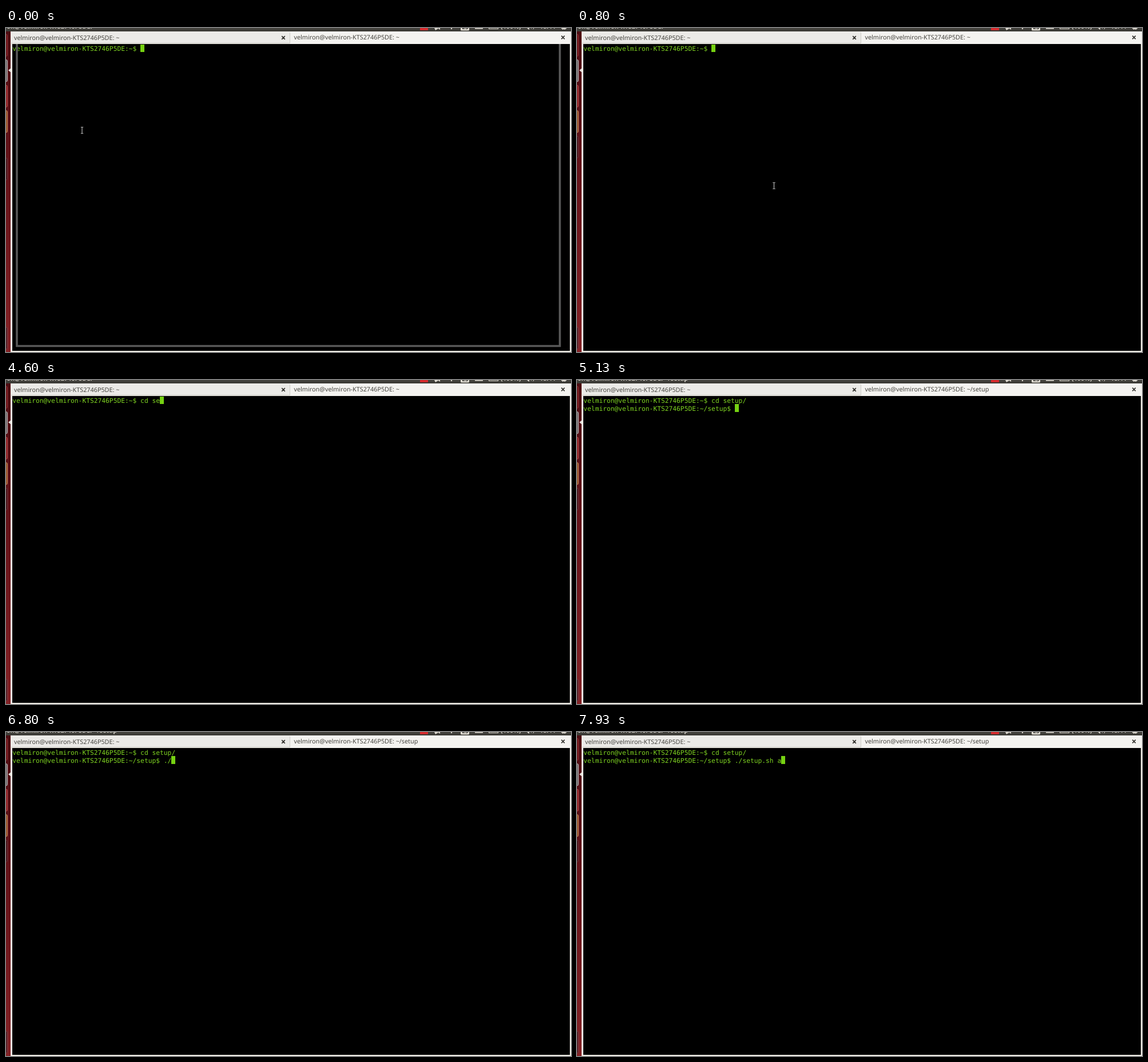
Recreate the animation shown at these times as an HTML page. Size 988x567 px, loop 8 s.

```html
<!DOCTYPE html>
<html lang="en">
<head>
<meta charset="utf-8">
<title>Terminal session</title>
<style>
  html, body { margin: 0; width: 100%; height: 100%; overflow: hidden; background: #000; }
  svg { display: block; width: 988px; height: 567px; }
  text { text-rendering: geometricPrecision; white-space: pre; }
  .ui { font: 10.8px "Noto Sans", "Open Sans", sans-serif; fill: #45443f; }
  .panel { font-weight: 700; fill: #dfdbd2; }
  .mono { font: 11.28px "DejaVu Sans Mono", monospace; fill: #7ed321; }
</style>
</head>
<body>
<svg viewBox="0 0 988 567">
  <defs>
    <linearGradient id="dock" x1="0" y1="0" x2="0" y2="1">
      <stop offset="0" stop-color="#4d0c12"/>
      <stop offset=".5" stop-color="#68141a"/>
      <stop offset="1" stop-color="#842226"/>
    </linearGradient>
    <linearGradient id="bar" x1="0" y1="0" x2="0" y2="1">
      <stop offset="0" stop-color="#45443f"/>
      <stop offset="1" stop-color="#393833"/>
    </linearGradient>
  </defs>

  <!-- window and tabs -->
  <rect width="988" height="567" fill="#f0eee6"/>
  <rect x="11" y="28" width="975" height="537" fill="#000"/>
  <rect x="9" y="6" width="488" height="20" fill="#ebeae7"/>
  <rect x="497" y="6" width="491" height="22" fill="#f4f3f0"/>
  <path d="M9 26.5H496.5V8" fill="none" stroke="#cfcdc8"/>
  <path d="M482.2 14.2l5.6 5.6m0-5.6l-5.6 5.6M971.2 13.7l5.6 5.6m0-5.6l-5.6 5.6" stroke="#34332f" stroke-width="1.7"/>
  <text class="ui" id="tabA" x="14" y="21"/>
  <text class="ui" id="tabB" x="503.5" y="20.3"/>

  <!-- launcher -->
  <rect y="6" width="8" height="561" fill="url(#dock)"/>
  <g id="icons"></g>
  <path d="M8 70.8v6.4l-4-3.2z" fill="#e4e0dc"/>

  <!-- top panel, cut off by the stage edge -->
  <rect width="988" height="6" fill="url(#bar)"/>
  <text class="ui panel" id="title" y="1.2" text-anchor="end"/>
  <rect x="724" width="14" height="4" fill="#d52a2d"/>
  <g fill="#dfdbd2">
    <path d="M749 0h10v3l-3-2-2 1-3 2z"/>
    <circle cx="779" cy="1" r="1.2"/>
    <rect x="795" y="-6" width="15" height="10.5" rx="1.5"/>
    <rect x="820" width="14" height="1.6"/>
    <path d="M844 0h1v1h15V0h1v2h-17z"/>
    <path d="M911 0h4v3l-3-2zM918 0h1l-1 2zM922 0h1.5l-2 3z"/>
    <path d="M971 0h9v1.5h-2v1.5h-1.5V2h-2v1H973V1.5h-2z"/>
    <text class="ui panel" x="865" y="1.2">(100%)</text>
    <text class="ui panel" x="933" y="1.2">18:44</text>
    <text class="ui" x="797" y="1.5" style="fill:#3c3b37;font-weight:700">Es</text>
  </g>

  <!-- terminal contents -->
  <rect id="cursor" width="7" fill="#76d212"/>
  <text class="mono" id="line1" x="11.3" y="40"/>
  <text class="mono" id="line2" x="11.3" y="53.5"/>
  <path id="outline" d="M19 28V556.5H968.5V28" fill="none" stroke="#585858" stroke-width="3.6"/>
  <path id="pointer" d="M-2-5.5h1.5l.5.5.5-.5H2M0-5V5M-2 5.5h1.5L0 5l.5.5H2" fill="none" stroke="#d8d8d8"/>
</svg>
<script>
const LOOP = 8000, STEP = 1000 / 15, CELL = 6.79;
const HOST = "velmiron@velmiron-KTS2746P5DE:";
const ENTER = 5000, PROMPT = 5060;

// Each entry: time in ms, text after the prompt from then on.
const FIRST = [[0, ""], [4060, "c"], [4200, "cd"], [4330, "cd "], [4460, "cd s"],
  [4595, "cd se"], [4725, "cd setup/"]];
const SECOND = [[0, ""], [5595, "."], [6060, "./"], [6325, "./s"], [6525, "./"],
  [6725, "./s"], [6795, "./"], [6925, "./s"], [7060, "./se"],
  [7195, "./setup.sh"], [7260, "./setup.sh "], [7795, "./setup.sh a"]];

const $ = id => document.getElementById(id);
const typed = (keys, t) => keys.filter(k => k[0] <= t).pop()[1];
const ease = (t, from, to) => {
  const p = Math.min(1, Math.max(0, (t - from) / (to - from)));
  return p * p * (3 - 2 * p);
};
function set(el, attrs) {
  for (const name in attrs) el.setAttribute(name, attrs[name]);
}

function addIcon(y, fill, stroke) {
  const icon = document.createElementNS("http://www.w3.org/2000/svg", "rect");
  set(icon, { x: -10, y, width: 12.5, height: 38.5, rx: 2.5, fill, stroke });
  $("icons").append(icon);
  return icon;
}
addIcon(11, "#6f171c", "#8e2c30");
addIcon(55.5, "#777073", "#b5adad");
addIcon(100, "#93262a", "#b24648");
addIcon(144.5, "#9c5830", "#bd8058");
addIcon(523.5, "#581f27", "#7c3c41");
const sliding = addIcon(189, "#4d171e", "#6a3036");

function draw(time) {
  const t = Math.floor((time % LOOP + 5) / STEP) * STEP;
  const home = t < PROMPT;
  const path = home ? "~" : "~/setup";
  const title = HOST + " " + path;

  $("tabA").textContent = HOST + " ~";
  $("tabB").textContent = title;
  $("title").textContent = title;
  set($("title"), { x: home ? 159.5 : 194 });

  const line1 = HOST + "~$ " + typed(FIRST, t);
  const line2 = home ? "" : HOST + path + "$ " + typed(SECOND, t);
  const below = t >= ENTER;
  $("line1").textContent = line1;
  $("line2").textContent = line2;
  set($("cursor"), {
    x: Math.round(11 + CELL * (below ? line2 : line1).length),
    y: below ? 42 : 29,
    height: below ? 14 : 13
  });

  const move = ease(t, 66, 800);
  set($("pointer"), {
    transform: `translate(${133 + 211.5 * move} ${179 + 97 * move})`,
    visibility: t < 3995 ? "visible" : "hidden"
  });
  set($("outline"), { opacity: 1 - ease(t, 66, 340) });
  set(sliding, { y: 227.5 - 38.5 * ease(t, 66, 600) });
}

function tick(now) {
  draw(now);
  requestAnimationFrame(tick);
}
draw(0);
requestAnimationFrame(tick);
</script>
</body>
</html>
```
